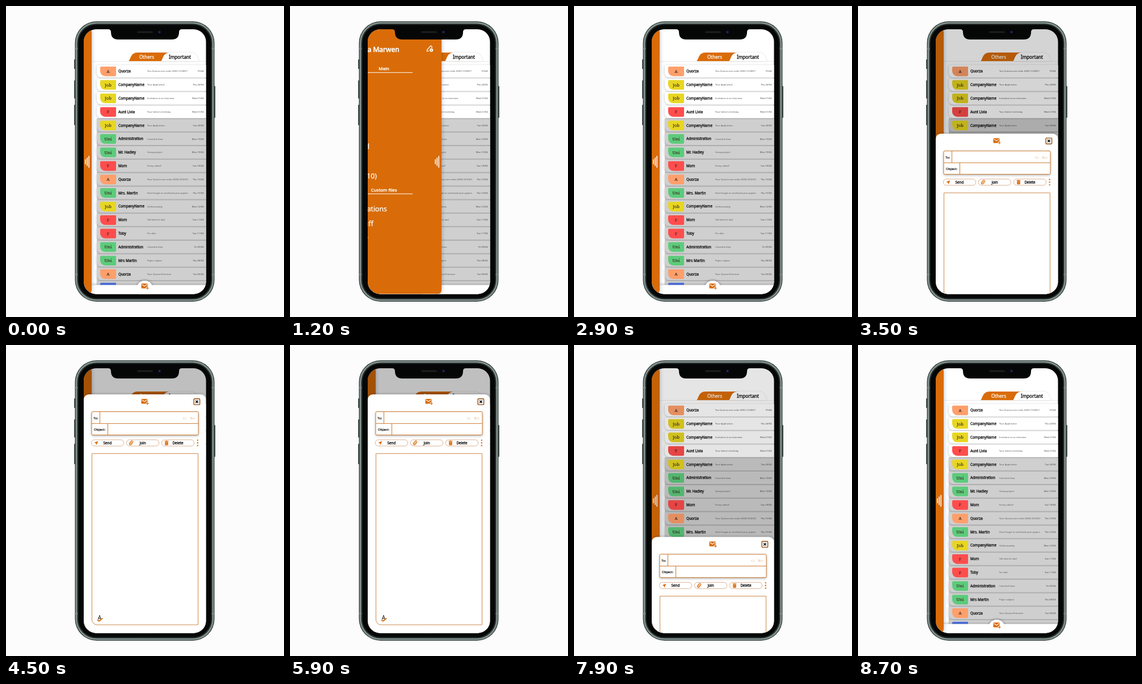
An HTML page with a canvas for the animation above (9.1 s loop, 490x548 px).

```html
<!DOCTYPE html>
<html lang="en">
<head>
<meta charset="utf-8">
<title>Mail app</title>
<style>
html, body { margin: 0; width: 100%; height: 100%; overflow: hidden; background: #fcfcfc; }
canvas { display: block; width: 490px; height: 548px; }
</style>
</head>
<body>
<canvas id="stage"></canvas>
<script>
const W = 490, H = 548, LOOP = 9100, STEP = 100;
const ORANGE = '#d96c08';
const SANS = '"Noto Sans", sans-serif', SERIF = '"Noto Serif", serif', KEYS = 'Inter, sans-serif';
const canvas = document.getElementById('stage');
const dpr = window.devicePixelRatio || 1;
canvas.width = W * dpr;
canvas.height = H * dpr;
const c = canvas.getContext('2d');

const BADGES = { A: '#ff9f6b', Job: '#e8d622', F: '#ff4d4d', Uni: '#5dcb7b' };
const MAILS = [
  ['A', 'Quorza', 'You Quorza.com order #000-1234567', '09:44'],
  ['Job', 'CompanyName', 'Your Application', 'Thu 24/04'],
  ['Job', 'CompanyName', 'Invitation to an interview', 'Wed 21/04'],
  ['F', 'Aunt Livia', 'Your father\u2019s birthday', 'Wed 21/04'],
  ['Job', 'CompanyName', 'Your Application', 'Tue 20/04'],
  ['Uni', 'Administration', 'Canceled class', 'Mon 19/04'],
  ['Uni', 'Mr. Hadley', 'Group project', 'Mon 19/04'],
  ['F', 'Mom', 'Funny video!!', 'Sun 18/04'],
  ['A', 'Quorza', 'Your Quorza.com order #000-5514321', 'Thu 15/04'],
  ['Uni', 'Mrs. Martin', 'Don\u2019t forget to send back your papers', 'Thu 15/04'],
  ['Job', 'CompanyName', 'Unfortunately.', 'Mon 12/04'],
  ['F', 'Mom', 'Gift idea for dad', 'Sun 11/04'],
  ['F', 'Toby', 'For dad', 'Sun 11/04'],
  ['Uni', 'Administration', 'Canceled class', 'Fri 09/04'],
  ['Uni', 'Mrs Martin', 'Paper subject', 'Thu 08/04'],
  ['A', 'Quorza', 'Your Quorza Premium', 'Tue 06/04']
];
const FOLDERS = ['Inbox (4)', 'Spams (2)', 'Drafts', 'Send', 'Scheduled', 'Trash (12)', 'Archives (10)'];
const CUSTOM = ['Job applications', 'Family stuff', 'University'];

function box(x, y, w, h, r, fill, stroke, lw = 1) {
  c.beginPath();
  c.roundRect(x, y, w, h, r);
  if (fill) { c.fillStyle = fill; c.fill(); }
  if (stroke) { c.strokeStyle = stroke; c.lineWidth = lw; c.stroke(); }
}

function disc(x, y, r, fill) {
  c.beginPath();
  c.arc(x, y, r, 0, Math.PI * 2);
  c.fillStyle = fill;
  c.fill();
}

function line(color, lw, ...pts) {
  c.beginPath();
  for (let i = 0; i < pts.length; i += 2) c.lineTo(pts[i], pts[i + 1]);
  c.strokeStyle = color;
  c.lineWidth = lw;
  c.stroke();
}

function poly(color, ...pts) {
  c.beginPath();
  for (let i = 0; i < pts.length; i += 2) c.lineTo(pts[i], pts[i + 1]);
  c.closePath();
  c.fillStyle = color;
  c.fill();
}

// y is the middle of the capitals; heavy thickens the strokes, in em
function text(s, x, y, size, color, { heavy = 0, align = 'left', font = SANS } = {}) {
  c.font = `400 ${size}px ${font}`;
  c.textAlign = align;
  c.fillStyle = color;
  c.fillText(s, x, y + size * 0.36);
  if (!heavy) return;
  c.lineJoin = 'round';
  c.strokeStyle = color;
  c.lineWidth = size * heavy;
  c.strokeText(s, x, y + size * 0.36);
}

function shaded(color, blur, dy, draw) {
  c.save();
  c.shadowColor = color;
  c.shadowBlur = blur * dpr;
  c.shadowOffsetY = dy * dpr;
  draw();
  c.restore();
}

function ramp(t, start, dur) {
  const k = Math.min(1, Math.max(0, (t - start) / dur));
  return k * k;
}

function mailIcon(x, y) {
  box(x - 6, y - 4.5, 11, 8.6, 1, ORANGE);
  line('#fff', 1.1, x - 5, y - 3, x - 0.5, y + 0.2, x + 4, y - 3);
  line('#fff', 3, x + 2, y + 3.6, x + 8, y + 3.6);
  line('#fff', 3, x + 4.8, y + 1, x + 4.8, y + 6);
  line(ORANGE, 1.2, x + 2.3, y + 3.6, x + 7.3, y + 3.6);
  line(ORANGE, 1.2, x + 4.8, y + 1.1, x + 4.8, y + 6.1);
}

function phone() {
  const metal = '#414c49';
  [[94, 17], [131, 32], [174, 36]].forEach(([y, h]) => box(120, y, 3, h, 1, metal));
  box(366, 141, 3, 56, 1, metal);
  const ring = (inset, color) =>
    box(121.5 + inset, 27 + inset, 246 - 2 * inset, 494 - 2 * inset, 38 - inset, color);
  ring(0, '#34403d');
  ring(1.2, '#73827e');
  ring(2.4, '#a0adaa');
  ring(3.4, '#4d5956');
  ring(4.8, '#1c2221');
  [75, 473].forEach(y => {
    box(121.5, y - 1, 4.8, 2.4, 0, '#7f8c88');
    box(362.7, y - 1, 4.8, 2.4, 0, '#7f8c88');
  });
  ring(6.4, '#050606');
}

function notch() {
  c.beginPath();
  c.moveTo(180, 36);
  c.lineTo(180, 41);
  c.quadraticCurveTo(185, 41, 185, 46);
  c.quadraticCurveTo(185, 59, 198, 59);
  c.lineTo(292, 59);
  c.quadraticCurveTo(305, 59, 305, 46);
  c.quadraticCurveTo(305, 41, 310, 41);
  c.lineTo(310, 36);
  c.fillStyle = '#050606';
  c.fill();
  box(231, 44.5, 28, 3, 1.5, '#1c1e20');
  disc(270.5, 46, 2.8, '#11152e');
  disc(270.5, 46, 1.3, '#25306a');
}

function tab(x, w, color) {
  c.beginPath();
  c.moveTo(x, 97.5);
  c.bezierCurveTo(x + 4, 94, x + 3, 82, x + 16, 82);
  c.lineTo(x + w - 16, 82);
  c.bezierCurveTo(x + w - 3, 82, x + w - 4, 94, x + w, 97.5);
  c.closePath();
  c.fillStyle = color;
  c.fill();
}

function row(i) {
  const y = 115 + i * 23.82;
  const mail = MAILS[i];
  shaded('rgba(0,0,0,.24)', 4, 1, () =>
    box(160, y - 11, 196, 22, [3, 0, 0, 8], i < 4 ? '#fff' : '#cfcfcf'));
  box(166, y - 8.3, 28, 17, [2, 1, 2, 9], mail ? BADGES[mail[0]] : '#4b6fe3');
  if (!mail) return;
  const [tag, name, subject, date] = mail;
  text(tag, 180, y, 7.6, '#3b2f20', { align: 'center', font: SERIF, heavy: 0.02 });
  text(name, 198, y, 6.3, '#151515', { heavy: 0.05 });
  text(subject, 249, y, 4.05, '#555');
  text(date, 348.5, y, 4.1, '#444', { align: 'right' });
}

function inbox() {
  box(137, 41, 216, 467, 0, '#fff');
  tab(216, 84, ORANGE);
  shaded('rgba(0,0,0,.16)', 3, 0, () => tab(273, 68, '#fff'));
  text('Others', 248, 90.4, 8.1, '#fff', { heavy: 0.03, align: 'center' });
  text('Important', 306.5, 90.4, 8.1, '#111', { heavy: 0.04, align: 'center' });
  line('#e4e4e4', 0.8, 152, 97.5, 352, 97.5);
  box(160, 198, 193, 294, 0, '#cfcfcf');
  for (let i = 0; i <= MAILS.length; i++) row(i);
  shaded('rgba(0,0,0,.3)', 4, -1, () => {
    box(137, 491.5, 216, 17, 0, '#fff');
    disc(244.5, 498, 14, '#fff');
  });
  disc(244.5, 498, 14, '#fff');
  box(137, 492, 216, 16, 0, '#fff');
  mailIcon(244.5, 493.5);
}

function avatar(x, y) {
  c.save();
  c.beginPath();
  c.arc(x, y, 20, 0, Math.PI * 2);
  c.clip();
  const g = c.createLinearGradient(x, y - 20, x, y + 20);
  g.addColorStop(0, '#c9962f');
  g.addColorStop(0.45, '#a37a38');
  g.addColorStop(1, '#263740');
  c.fillStyle = g;
  c.fillRect(x - 20, y - 20, 40, 40);
  poly('#426a86', x + 8, y - 16, x + 15, y - 10, x + 12, y + 3, x + 6, y);
  disc(x + 3, y + 2, 6, '#2b2a2b');
  box(x - 6, y + 8, 18, 18, 7, '#22282c');
  c.restore();
}

function pencil(x, y) {
  c.save();
  c.translate(x, y);
  c.lineJoin = 'round';
  line('#fff', 1.2, -5, 5, -4, 1.5, 2, -5, 4.5, -2.6, 3.2, -1);
  line('#fff', 1.2, -5, 5, -1, 4);
  disc(3, 2.8, 3, '#fff');
  disc(3, 2.8, 1, ORANGE);
  c.restore();
}

function drawer(open) {
  const edge = 151 + 201 * open;
  shaded('rgba(0,0,0,.3)', 7, 0, () => box(edge - 240, 41, 240, 466.5, [0, 5, 7, 0], ORANGE));
  [5, 8, 11].forEach((d, i) => box(edge - d - 0.6, 264 + i * 3, 1.6, 21 - i * 6, 0.8, '#fff'));
  if (!open) return;
  c.save();
  c.translate(edge - 311, 0);
  avatar(140, 74);
  text('Ida Marwen', 169, 76.8, 12, '#fff', { heavy: 0.05 });
  pencil(290, 75);
  const heading = (s, y) => {
    text(s, 209.5, y, 7.9, '#fff', { heavy: 0.045, align: 'center' });
    line('#fff', 1.1, 159, y + 7, 260, y + 7);
  };
  const items = (list, y) => list.forEach((s, i) =>
    text(s, 124.3, y + i * 25.9, 12.2, '#fff', { heavy: 0.02 }));
  heading('Main', 110.2);
  items(FOLDERS, 143.8);
  heading('Custom files', 324);
  items(CUSTOM, 357.8);
  c.restore();
}

function planeIcon(x, y) {
  poly(ORANGE, x - 3.6, y - 0.4, x + 3.4, y - 3.2, x + 0.6, y + 3.8, x - 0.6, y + 0.8);
}

function clipIcon(x, y) {
  c.save();
  c.translate(x, y);
  c.rotate(0.7);
  box(-1.9, -4, 3.8, 8, 1.9, null, ORANGE, 1);
  box(-0.7, -2, 1.6, 5, 0.8, null, ORANGE, 0.8);
  c.restore();
}

function trashIcon(x, y) {
  box(x - 2.8, y - 2.3, 5.6, 6, 0.8, ORANGE);
  box(x - 3.4, y - 3.6, 6.8, 1, 0, ORANGE);
  box(x - 1.2, y - 4.2, 2.4, 1, 0, ORANGE);
  line('rgba(255,255,255,.6)', 0.5, x - 1, y - 1.2, x - 1, y + 2.6);
  line('rgba(255,255,255,.6)', 0.5, x + 1, y - 1.2, x + 1, y + 2.6);
}

function formatIcon(x, y) {
  text('A', x, y - 1, 10, '#111', { align: 'center' });
  c.beginPath();
  c.moveTo(x - 4, y + 4);
  c.quadraticCurveTo(x, y + 6.5, x + 2, y + 3);
  c.lineTo(x + 5.2, y + 0.6);
  c.strokeStyle = ORANGE;
  c.lineWidth = 1.9;
  c.stroke();
}

function key(x, y, w, label, { fill = '#fff', size = 14 } = {}) {
  box(x - w / 2, y - 11.8, w, 25, 3, '#898c92');
  box(x - w / 2, y - 12.5, w, 25, 3, fill);
  if (label) text(label, x, y, size, '#111', { align: 'center', font: KEYS });
}

function keyboard(y) {
  box(137, y, 216, 130, 0, '#d5d8df');
  ['QWERTYUIOP', 'ASDFGHJKL', 'ZXCVBNM'].forEach((letters, r) => {
    const first = 244 - (letters.length - 1) * 10.7;
    [...letters].forEach((s, i) => key(first + i * 21.4, y + 17 + r * 31, 17.6, s));
  });
  const gray = { fill: '#adb3be', size: 7.5 };
  const y3 = y + 79, y4 = y + 110;
  key(151.5, y3, 23, '');
  poly('#111', 151, y3 - 5, 156.5, y3 + 0.6, 153.4, y3 + 0.6, 153.4, y3 + 4.6,
    148.6, y3 + 4.6, 148.6, y3 + 0.6, 145.5, y3 + 0.6);
  key(338.5, y3, 23, '', gray);
  line('#111', 0.9, 332, y3, 336, y3 - 4.2, 345, y3 - 4.2, 345, y3 + 4.2, 336, y3 + 4.2, 332, y3);
  line('#111', 0.9, 337.5, y3 - 2, 341.7, y3 + 2);
  line('#111', 0.9, 341.7, y3 - 2, 337.5, y3 + 2);
  key(162, y4, 44, '123', gray);
  key(243.5, y4, 111, 'space', { size: 7.5 });
  key(326, y4, 46, 'return', gray);
}

function sheet(shown, typing) {
  const border = '#cc7a30';
  box(137, 41, 216, 467, 0, `rgba(0,0,0,${0.25 * shown})`);
  c.save();
  c.translate(0, 508 - 421 * shown);
  shaded('rgba(0,0,0,.2)', 4, -1, () => box(137, 0, 215.5, 440, [9, 9, 0, 0], '#fff'));
  mailIcon(244.5, 12.5);
  box(331.2, 7.7, 10.4, 10.4, 1.2, '#fff', '#8f4a0c', 1.4);
  line('#111', 1.5, 334.2, 10.7, 338.6, 15.1);
  line('#111', 1.5, 338.6, 10.7, 334.2, 15.1);

  shaded('rgba(0,0,0,.35)', 4, 1.5, () => box(151, 30.5, 188, 41, 2, '#fff'));
  box(151, 30.5, 188, 41, 2, null, border, 1);
  line(border, 1, 151, 51.3, 339, 51.3);
  line(border, 1, 165.5, 30.5, 165.5, 51.3);
  line(border, 1, 179.5, 51.3, 179.5, 71.5);
  text('To:', 154, 41.5, 6.1, '#111', { heavy: 0.04 });
  text('Object:', 154.8, 62, 6.1, '#111', { heavy: 0.04 });
  text('Cc', 312, 41.5, 5.9, '#e5b68a');
  text('Bcc', 324.5, 41.5, 5.9, '#e5b68a');

  ['Send', 'Join', 'Delete'].forEach((s, i) => {
    box(150.5 + i * 62, 80, 57, 11, 5, '#fff', '#d9a987', 0.9);
    text(s, 179 + i * 62, 85.8, 6.3, '#111', { heavy: 0.05, align: 'center' });
  });
  planeIcon(159, 85.5);
  clipIcon(220.5, 85.5);
  trashIcon(283, 85.7);
  [80.8, 85.5, 90.2].forEach(y => disc(337.8, y, 1.4, '#dc8a45'));

  const end = typing ? 288 : 406;
  box(151.5, 104.3, 187, end - 104.3, [0, 0, 0, 9], null, '#cc8a4c', 1);
  formatIcon(165, end - 12);
  if (typing) keyboard(295);
  c.restore();
}

function draw(now) {
  const t = Math.floor((now % LOOP) / STEP) * STEP;
  const open = ramp(t, 896, 400) - ramp(t, 2237, 360);
  const shown = ramp(t, 3172, 400) - ramp(t, 7591, 400);
  c.setTransform(dpr, 0, 0, dpr, 0, 0);
  c.fillStyle = '#fcfcfc';
  c.fillRect(0, 0, W, H);
  phone();
  c.save();
  c.beginPath();
  c.roundRect(137, 41, 215.5, 466.5, 22);
  c.clip();
  inbox();
  drawer(open);
  if (shown > 0) sheet(shown, t >= 6500);
  c.restore();
  notch();
  requestAnimationFrame(draw);
}
requestAnimationFrame(draw);
</script>
</body>
</html>
```
